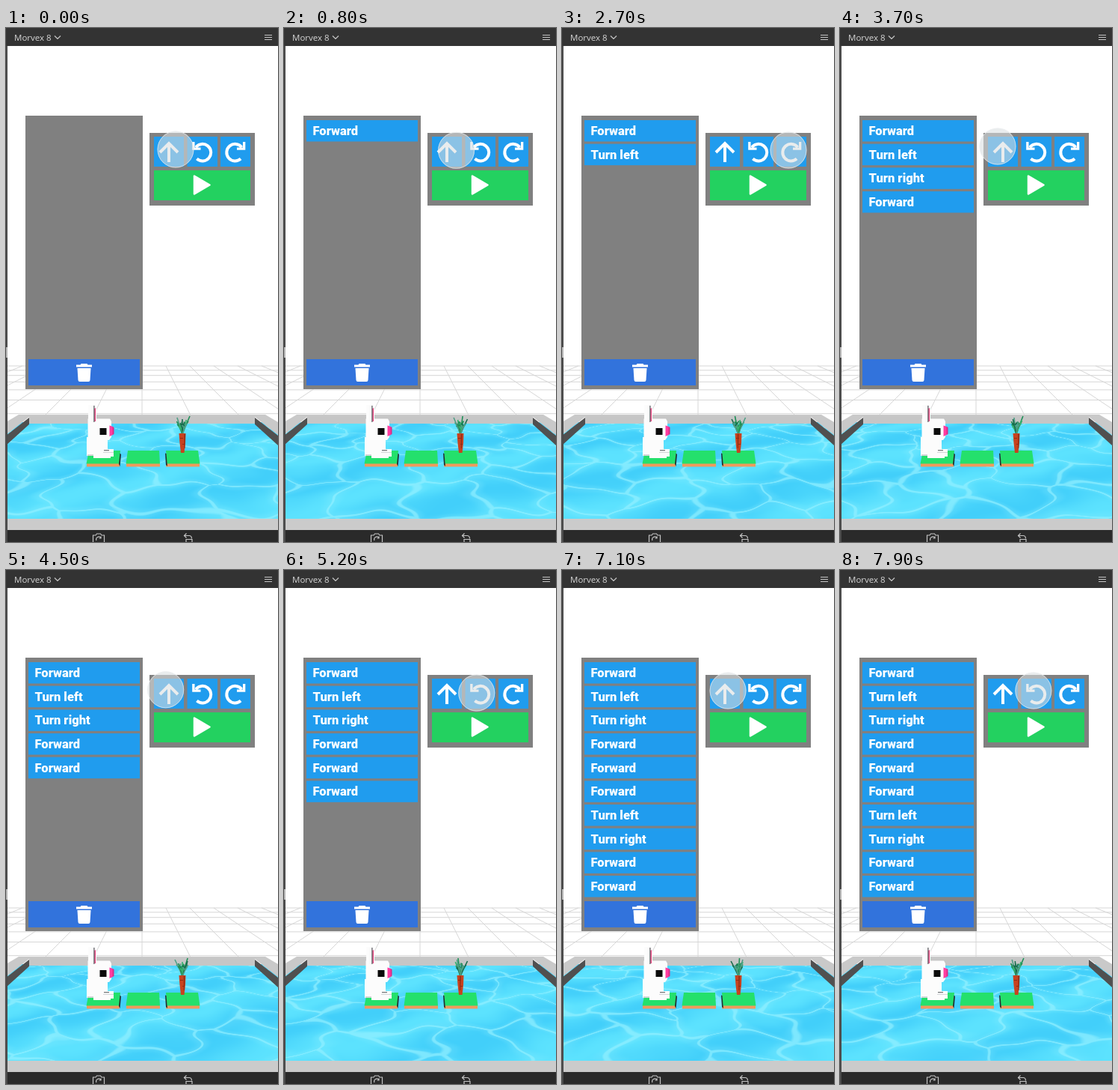
An HTML page with a canvas for the animation above (8000 ms loop, 364 px wide and 686 px high).

```html
<!DOCTYPE html>
<html lang="en">
<head>
<meta charset="utf-8">
<title>Rabbit puzzle</title>
<style>
html, body { margin: 0; width: 100%; height: 100%; overflow: hidden; background: #fff; }
canvas { position: absolute; left: 0; top: 526px; }
svg { position: absolute; left: 0; top: 0; display: block; }
.cmd { font: 800 16.5px Roboto, sans-serif; fill: #fff; }
.bar { font: 11.5px "Open Sans", sans-serif; fill: #d6d6d6; }
.ico { fill: none; stroke: #fff; stroke-width: 4; }
.line { fill: none; stroke: #c4c4c4; stroke-width: 1.2; }
</style>
</head>
<body>
<canvas id="water" width="364" height="132"></canvas>
<svg width="364" height="686" viewBox="0 0 364 686">
  <defs>
    <g id="turn">
      <path class="ico" d="M-9 -6.8A11.3 11.3 0 1 1 -7.6 8.600"/>
      <path d="M-13.800 -14H-10.500V-6.500H-2.500V-3.200H-13.800Z" fill="#fff"/>
    </g>
  </defs>

  <path id="grid" fill="none" stroke="#d6d6d6" stroke-width="1"/>

  <!-- pool -->
  <path d="M17 516H347L364 526V543L333 519H31L0 543V526Z" fill="#c9c9c9"/>
  <path d="M31 518H333V528H31Z" fill="#c6c6c6"/>
  <path d="M31 520V529L0 557V544ZM333 520V529L364 557V544Z" fill="#505050"/>
  <path d="M0 655H364V670H0Z" fill="#cbcbcb"/>

  <!-- platforms -->
  <path d="M108 581H152V585.500H108ZM161 581H206V585.500H161ZM214 581H259V585.500H214Z" fill="#f09a5c"/>
  <path d="M111 564H153L151.500 581.500H107.500ZM163 564H205L206 581.500H160.500ZM214 564H257L259.500 581.500H215.500Z" fill="#24e06c"/>
  <path d="M152.500 567.500L154 569L152.500 585L151 582ZM213 567.500L214.500 568L216 585L214 583Z" fill="#20302a"/>

  <!-- rabbit -->
  <g fill="#fcfcfc">
    <path d="M110 503H121V524H110Z"/>
    <path d="M109.500 521.500H139L141 525V546L138 550H109.500Z"/>
    <path d="M108 546H136V562H144V572H140V574H117V571H108Z"/>
  </g>
  <path d="M118.300 508L120 507V525H118.300Z" fill="#e8447f"/>
  <path d="M117.300 504H118.500V526H117.300Z" fill="#54545a"/>
  <path d="M109 569H117V571H109ZM130 566H144V567H130Z" fill="#d3d6d8"/>
  <path d="M131 563H138V564.300H131Z" fill="#777b7e"/>
  <path d="M138.500 530.500L143 532V543L138.500 545Z" fill="#ff3da0"/>
  <path d="M142.600 532L144.500 533V542L142.600 543Z" fill="#d92c85"/>
  <path d="M125.500 534H134.500V543H125.500Z" fill="#0b0b0b"/>

  <!-- carrot -->
  <g id="leaves"></g>
  <path d="M231.500 541H240.500L240 554L238.500 567H234L232.500 554Z" fill="#c8421f"/>
  <path id="shade" fill="#8f2c14"/>

  <!-- program list -->
  <path d="M26 117H183V482H26Z" fill="#808080"/>
  <g id="rows"></g>
  <path d="M30 442H179V477H30Z" fill="#3273dc"/>
  <g fill="#fff">
    <path d="M100.500 448H108.500L109.500 449.500H115V452.500H94V449.500H99.500Z"/>
    <path d="M95.500 454H113.500L112.500 470Q112.300 472 110.300 472H98.700Q96.700 472 96.500 470Z"/>
  </g>

  <!-- controls -->
  <path d="M192 140H333V237H192Z" fill="#808080"/>
  <path d="M198 145H238V185H198ZM242.500 145H283V185H242.500ZM287 145H327V185H287Z" fill="#209cee"/>
  <path d="M198 190H327V230H198Z" fill="#23d160"/>
  <path class="ico" d="M218 179V153.500M206 166L218 154L230 166"/>
  <use href="#turn" x="263" y="166"/>
  <use href="#turn" transform="translate(306.500 166) scale(-1 1)"/>
  <path d="M252 197.500V221.500L272.500 209.500Z" fill="#fff" stroke="#fff" stroke-width="2.500" stroke-linejoin="round"/>

  <g id="touch">
    <circle r="24.500" fill="#d9dee0" fill-opacity=".58"/>
    <circle r="24" fill="none" stroke="#eef1f2" stroke-opacity=".6"/>
  </g>

  <!-- window frame -->
  <path d="M0 0H2V686H0Z" fill="#4a4a4a"/>
  <path d="M0 426H2V440H0Z" fill="#b4b4b4"/>
  <path d="M0 0H364V24H0Z" fill="#333"/>
  <path d="M2 670H364V686H2Z" fill="#2a2a2a"/>
  <text class="bar" x="11" y="16.700">Morvex 8</text>
  <path class="line" d="M65 10.500L69 14.500L73 10.500M346 9.500H356M346 12.500H356M346 15.500H356"/>
  <path class="line" d="M116.500 687V677H120L121.500 675H126.500L128 677H131.500V687M121 684A3.500 3.500 0 0 1 127 680.500M127 678.500V681H124.500"/>
  <path class="line" d="M241.500 674.500L238.500 677.500L241.500 680.500M239 677.500H245Q248.500 677.500 248.500 681.500M241 687V682.500H249V687"/>
</svg>

<script>
const LOOP = 8000, STEP = 100;
const $ = id => document.getElementById(id);
const NS = "http://www.w3.org/2000/svg";

function add(parent, tag, attrs, text) {
  const el = document.createElementNS(NS, tag);
  for (const k in attrs) el.setAttribute(k, attrs[k]);
  if (text) el.textContent = text;
  return parent.appendChild(el);
}

// Each command and the time it joins the list
const commands = [
  [200, "Forward"], [1300, "Turn left"], [2800, "Turn right"],
  [3500, "Forward"], [4100, "Forward"], [4600, "Forward"],
  [5300, "Turn left"], [5800, "Turn right"],
  [6500, "Forward"], [7000, "Forward"]
];
const rows = commands.map(([at, label], i) => {
  const g = add($("rows"), "g", {});
  const y = 123 + i * 31.67;
  add(g, "rect", { x: 30, y, width: 149, height: 28.5, fill: "#209cee" });
  add(g, "text", { class: "cmd", x: 38.5, y: y + 20 }, label);
  return { at, g };
});

// Touch point: time, x, y
const path = [
  [0, 227, 162], [700, 226, 163], [1100, 255, 165], [1600, 256, 165],
  [2100, 301, 164], [2700, 303, 163], [3000, 303, 163], [3400, 212, 158],
  [3700, 211, 158], [4700, 214, 160], [5000, 257, 164], [5300, 258, 164],
  [5600, 303, 163], [5900, 303, 163], [6200, 224, 162], [7200, 222, 161],
  [7600, 258, 161], [8000, 259, 161]
];

function touchAt(t) {
  let i = 0;
  while (i < path.length - 2 && t >= path[i + 1][0]) i++;
  const [t0, x0, y0] = path[i], [t1, x1, y1] = path[i + 1];
  const p = (t - t0) / (t1 - t0), e = p * p * (3 - 2 * p);
  return [x0 + (x1 - x0) * e, y0 + (y1 - y0) * e];
}

// Floor and water share one vanishing point
const VX = 182, VY = 387;

function drawGrid() {
  let d = "";
  for (let k = 0; k < 7; k++) {
    const y = VY + 1 / (0.01563 - 0.0013 * k);
    d += `M2 ${y.toFixed(1)}H364`;
  }
  for (let k = -7; k <= 7; k++) {
    d += `M${VX + k * 32} 451L${VX + k * 65} 517`;
  }
  $("grid").setAttribute("d", d);
}

const ctx = $("water").getContext("2d");
const W = 364, H = 132, TOP = 526;
const img = ctx.createImageData(W, H);

const hash = (x, y, s) => {
  const n = Math.sin(x * 127.1 + y * 311.7 + s * 74.7) * 43758.5453;
  return n - Math.floor(n);
};
const smooth = (a, b, x) => {
  const p = Math.min(1, Math.max(0, (x - a) / (b - a)));
  return p * p * (3 - 2 * p);
};

// Cell seeds over the visible part of the plane
const N = 20;
function seedsAt(t) {
  const xs = [], ys = [];
  for (let j = 0; j < N; j++) {
    for (let i = 0; i < N; i++) {
      const a = hash(i, j, 1) * 6.283, b = hash(i, j, 2);
      xs.push(i + 0.5 + 0.34 * Math.sin(a + t * (0.7 + b)));
      ys.push(j + 0.5 + 0.34 * Math.cos(a * 1.7 + t * (0.6 + b)));
    }
  }
  return [xs, ys];
}

const DEEP = [66, 207, 250], BASE = [92, 226, 254], LIGHT = [150, 241, 255];

function drawWater(t) {
  const [xs, ys] = seedsAt(t);
  const px = img.data;
  for (let y = 0; y < H; y++) {
    const s = y + TOP - VY;
    const v0 = 1500 / s - 3;
    for (let x = 0; x < W; x++) {
      const u0 = (x - VX) / s * 2.6 + 9;
      const u = u0 + 0.13 * Math.sin(v0 * 4.3 + t) + 0.05 * Math.sin(v0 * 9 - u0 * 3) + t * 0.1;
      const v = v0 + 0.13 * Math.sin(u0 * 3.7 - t * 0.8) + 0.05 * Math.sin(u0 * 8 + v0 * 2) + t * 0.08;
      const cx = Math.floor(u), cy = Math.floor(v);
      let a = 9, b = 9;
      for (let j = cy - 1; j <= cy + 1; j++) {
        for (let i = cx - 1; i <= cx + 1; i++) {
          const k = j * N + i;
          const dx = xs[k] - u, dy = ys[k] - v;
          const d = dx * dx + dy * dy;
          if (d < a) { b = a; a = d; } else if (d < b) b = d;
        }
      }
      const edge = Math.sqrt(b) - Math.sqrt(a);
      const width = 0.1 + 0.04 * Math.sin(u * 2.3 + v * 1.7);
      const line = 1 - smooth(width * 0.2, width, edge);
      const glow = 0.22 * (1 - smooth(0, 0.34, edge));
      const lit = Math.max(line * 0.7, glow);
      const tone = 0.5 + 0.5 * Math.sin(u * 1.9 - v * 2.6 + 1);
      const o = (y * W + x) * 4;
      for (let c = 0; c < 3; c++) {
        const body = DEEP[c] + (BASE[c] - DEEP[c]) * tone;
        px[o + c] = body + (LIGHT[c] - body) * lit;
      }
      px[o + 3] = 255;
    }
  }
  ctx.putImageData(img, 0, 0);
}

// Carrot top: thin stems with small blades around a turning axis
const greens = ["#1f8f57", "#36b36f", "#176b4c", "#4f9f86"];
const leaves = Array.from({ length: 8 }, (_, i) =>
  add($("leaves"), "path", { fill: "none", stroke: greens[i % 4], "stroke-width": 1.6 }));

function drawCarrot(t) {
  const turn = t * 1.57;
  leaves.forEach((leaf, i) => {
    const x = 236 + Math.cos(turn + i * 0.785) * (10 - (i % 3) * 2.5);
    const y = 518 + (i * 5) % 13;
    const mx = (x + 236) / 2, my = (y + 541) / 2;
    leaf.setAttribute("d",
      `M236 542L${mx} ${my}L${x} ${y}M${mx - 3} ${my - 4}L${mx} ${my}L${mx + 3} ${my - 5}`);
  });
  const sx = 236 + 2.5 * Math.cos(turn);
  $("shade").setAttribute("d", `M${sx} 542h1.600l-.6 19h-1ZM233 547h4v1h-4ZM236 555h3v1h-3Z`);
}

let last = -1;
function draw(ms) {
  const t = Math.floor(ms % LOOP / STEP) * STEP;
  if (t === last) return;
  last = t;
  for (const r of rows) r.g.setAttribute("visibility", t >= r.at ? "visible" : "hidden");
  const [x, y] = touchAt(t);
  $("touch").setAttribute("transform", `translate(${x.toFixed(2)} ${y.toFixed(2)})`);
  drawWater(t / 1000);
  drawCarrot(t / 1000);
}

drawGrid();
const start = performance.now();
function tick() {
  draw(performance.now() - start);
  requestAnimationFrame(tick);
}
tick();
</script>
</body>
</html>
```
